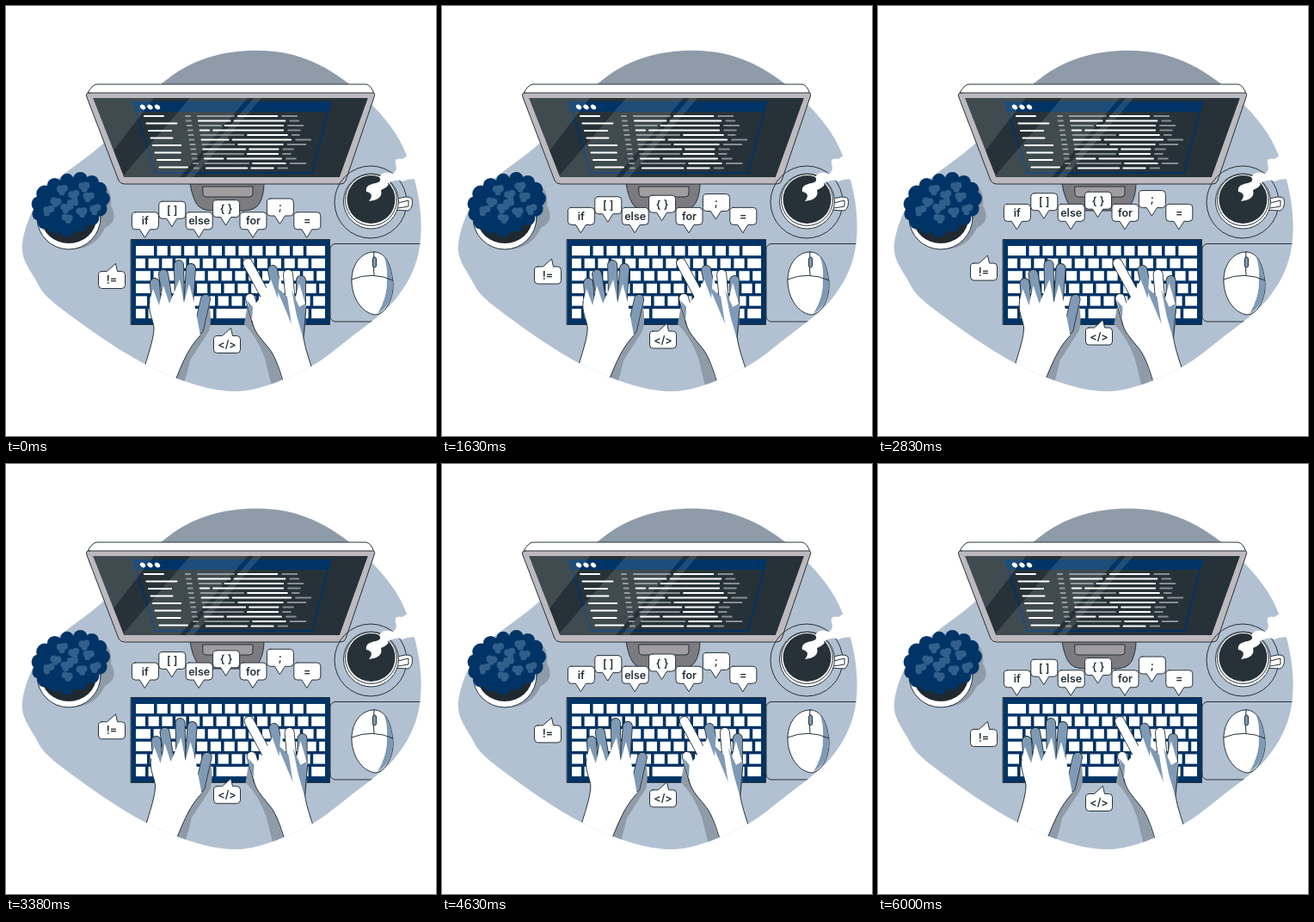
Write an HTML page that moves like this. It is 500x500 px and loops after 6040 ms.

```html
<!DOCTYPE html>
<html lang="en">
<head>
<meta charset="utf-8">
<title>Coding at a desk</title>
<style>
  html, body { margin: 0; width: 100%; height: 100%; overflow: hidden; background: #fff; }
  svg { display: block; width: 100%; height: 100%; }
  text { font: 600 12.5px Inter, "Open Sans", sans-serif; text-anchor: middle; fill: #263238; }
  .ink { stroke: #263238; stroke-width: 1; stroke-linejoin: round; stroke-linecap: round; }
  .line { fill: none; }
  .white { fill: #fff; }
  .navy { fill: #003466; }
  .dark { fill: #263238; }
  .shade { fill: #7f9ab6; }
  .shadow { fill: #8f9ba8; }
</style>
</head>
<body>
<svg viewBox="0 0 500 500">
  <defs>
    <clipPath id="clip"><path id="blob"/></clipPath>
    <clipPath id="screen"><path d="M101 107H421L388 199H137Z"/></clipPath>
  </defs>

  <g clip-path="url(#clip)">
    <rect class="shadow" width="500" height="100"/>
    <rect y="100" width="500" height="400" fill="#b2c1d1"/>
    <rect class="ink line" x="377" y="276.500" width="130" height="90.500" rx="6"/>
  </g>

  <!-- monitor -->
  <path class="ink" fill="#7c7b80" d="M214 206Q216 220 221 229Q226 238 240 238H276Q290 238 295 229Q300 219 300 206Z"/>
  <path class="ink" fill="#a09da1" d="M229 210H287V218Q287 222 283 222H233Q229 222 229 218Z"/>
  <path class="ink white" d="M94 103Q100 91 106 91H418Q424 91 428 102L420 108H100Z"/>
  <path class="ink" fill="#bcb9bf" d="M97 101H426Q430 101 428 106L395 203Q394 207 389 207H138Q133 207 131 203L94 106Q92 101 97 101Z"/>
  <g clip-path="url(#screen)">
    <path class="dark" d="M101 107H421L388 199H137Z"/>
    <path class="navy" d="M146 111H378L374 123H150Z"/>
    <path fill="none" stroke="#003466" stroke-width="2" d="M148 112L173 194H356L377 112Z"/>
    <path fill="#fff" opacity=".12" d="M101 107H172L125 168ZM214 107H281L202 199H135ZM288 107H297L218 199H209Z"/>
    <g class="white" id="code"></g>
  </g>

  <!-- plant -->
  <path class="shadow" d="M84 202Q126 200 122 232Q132 250 115 258Q104 282 78 283Z"/>
  <circle class="ink white" cx="73" cy="246" r="37"/>
  <ellipse cx="73" cy="247" rx="32" ry="29" fill="#20292f"/>
  <g id="leaves" class="navy"></g>
  <g id="tufts" fill="#315f8b"></g>

  <!-- coffee -->
  <circle class="ink line" cx="424" cy="228" r="42"/>
  <path class="ink white" d="M450 226Q468 219 472 224Q474 234 468 238L448 237Z"/>
  <path class="ink line" d="M456 229L468 226V233L456 235"/>
  <circle class="ink white" cx="424.500" cy="227" r="32"/>
  <circle class="ink white" cx="424.500" cy="225.500" r="30"/>
  <circle class="dark" cx="424.500" cy="225" r="28"/>
  <path class="white" d="M484 173Q467 172 461 178Q451 176 453 184Q456 191 450 195Q438 191 434 199Q438 204 430 206Q417 208 419 216Q429 218 422 227Q439 225 436 214Q447 209 444 206Q455 200 461 204Q470 199 484 203Z"/>

  <!-- mouse -->
  <path class="ink white" d="M428 286C442 286 448 302 450 322C451 342 440 359 429 359C414 357 403 340 402 322C401 302 412 286 428 286Z"/>
  <path class="shade" d="M439 290Q449 304 450 324Q449 348 432 358Q444 338 443 318Q444 302 439 290Z"/>
  <path class="ink line" d="M402 318Q426 308 450 319M428 286Q426 299 428 313"/>
  <rect class="ink shade" x="426.500" y="292" width="4" height="12" rx="2"/>

  <rect class="ink navy" x="145.500" y="271.500" width="231" height="99"/>
  <g id="keys" class="white"></g>

  <g clip-path="url(#clip)"><g id="hands">
    <path class="shadow" d="M236 346Q240 366 236 378L214 412Q211 428 203 450L190 448L207 405L228 378ZM281 346L277 370Q292 385 301 410L311 450H326L310 402Z"/>
    <g id="fingers"></g>
    <path class="white" d="M154 446C162 412 172 390 172 374C171 364 165 356 167 343L171 329L178 348L183 325L190 346L202 318L207 345L213 323L219 346L226 383C212 398 206 412 192 448Z"/>
    <path class="white" d="M326 450C318 420 312 405 304 396C295 385 288 378 286 366L291 345L299 335L308 318L316 340L318 312L325 342L331 316L336 342L341 322L349 350L346 385C348 400 354 415 362 440Z"/>
    <path class="shade" d="M313 325L322 346L332 370L327 338ZM332 330L338 360L346 388Q350 370 348 346L341 350ZM280 342L287 350L286 366Z"/>
    <path class="ink line" d="M154 446C162 412 172 390 172 374C171 364 165 356 167 343M226 383C212 398 206 412 192 448M326 450C318 420 312 405 304 396C295 385 288 378 286 366M349 350L346 385C348 400 354 415 362 440"/>
  </g></g>

  <g id="bubbles"></g>
</svg>
<script>
const el = id => document.getElementById(id);
const rect = (x, y, w, h, extra = '') => `<rect x="${x}" y="${y}" width="${w}" height="${h}" ${extra}/>`;
const circle = (x, y, r) => `<circle cx="${x}" cy="${y}" r="${r}"/>`;
const repeat = (n, draw) => Array.from({ length: n }, (_, i) => draw(i)).join('');

let seed = 7;
const random = (min, max) => {
  seed = seed * 16807 % 2147483647;
  return min + (max - min) * seed / 2147483647;
};

// Closed smooth curve through a flat list of x, y pairs.
function smooth(list) {
  const n = list.length / 2;
  const p = i => [list[(i + n) % n * 2], list[(i + n) % n * 2 + 1]];
  let d = 'M' + p(0);
  for (let i = 0; i < n; i++) {
    const [a, b, c, e] = [p(i - 1), p(i), p(i + 1), p(i + 2)];
    const c1 = b.map((v, k) => v + (c[k] - a[k]) / 6);
    const c2 = c.map((v, k) => v - (e[k] - b[k]) / 6);
    d += `C${c1} ${c2} ${c}`;
  }
  return d + 'Z';
}
el('blob').setAttribute('d', smooth([
  19, 276, 45, 216, 113, 160, 180, 91, 235, 60, 300, 52, 357, 65, 410, 100, 457, 155,
  480, 225, 479, 290, 452, 342, 400, 386, 345, 424, 263, 448, 165, 418, 62, 350, 33, 316]));

// Window buttons and code in three slanted columns
const dash = (x, y, w, opacity) => rect(x, y - 0.9, w, 1.8, `rx=".9" opacity="${opacity}"`);
el('code').innerHTML = repeat(3, i => {
  const x = 159 + i * 8.5;
  return `<ellipse cx="${x}" cy="117.500" rx="3.400" ry="2.500" transform="rotate(35 ${x} 117.500)"/>`;
}) + repeat(8, i => dash(160 + i * 2.5, 128 + i * 8.5, random(24, 38), 1))
  + repeat(12, i => {
    const y = 128 + i * 5.5, x = 222 + i * 0.9, split = random(10, 55), end = random(75, 105);
    return dash(208 + i * 0.9, y, 7, 0.45) + dash(x, y, split, i % 2 ? 1 : 0.45)
      + dash(x + split + 3, y, end - split, 1) + dash(x + end + 7, y, random(8, 24), 0.45);
  });

// Foliage: a scalloped ellipse with tufts spread on a sunflower spiral
el('leaves').innerHTML = '<ellipse cx="75" cy="230" rx="38" ry="29"/>' + repeat(15, i => {
  const a = i / 15 * 2 * Math.PI;
  return circle(75 + 37 * Math.cos(a), 230 + 28 * Math.sin(a) - 6 * Math.cos(a), random(7.5, 10));
});
el('tufts').innerHTML = repeat(11, i => {
  const a = i * 2.4, r = Math.sqrt(i / 11);
  const x = 75 + 33 * r * Math.cos(a), y = 229 + 23 * r * Math.sin(a);
  return circle(x, y, 4) + circle(x + 5, y + random(-3, 3), 4) + circle(x + random(-2, 4), y + 4, 3.5);
});

// Each keyboard row starts with a key of its own width and ends with a stretched one.
const pitch = 15.8, gap = 3.6, right = 371;
el('keys').innerHTML = [21, 11, 17, 20, 13, 11].map((first, row) => {
  let keys = '';
  for (let x = 151, w = first; x < right - 5; x += w + gap, w = pitch - gap) {
    if (row === 5 && x > 230 && x < 245) w += pitch * 2;
    if (right - x - w < 10) w = right - x;
    keys += rect(x, 279 + row * 14.6, w, 11.2);
  }
  return keys;
}).join('');

// Outlined round-ended finger from its base to its tip
const finger = (fill, x1, y1, x2, y2) => [['#263238', 12], [fill, 10.2]].map(([color, w]) =>
  `<path d="M${x1} ${y1}L${x2} ${y2}" stroke="${color}" stroke-width="${w}" stroke-linecap="round"/>`).join('');
const blue = '#7f9ab6', white = '#fff';
el('fingers').innerHTML = finger(blue, 175, 350, 173, 322) + finger(blue, 189, 348, 183, 312)
  + finger(blue, 202, 348, 201, 301) + finger(blue, 212, 348, 215, 305) + finger(blue, 224, 376, 232, 341)
  + finger(blue, 343, 356, 343, 319) + finger(white, 331, 345, 328, 312) + finger(blue, 318, 345, 310, 307)
  + finger(white, 306, 345, 281, 299) + finger(white, 292, 368, 284, 340);

// Speech bubble with a tail below, or above when up is set
function bubble(label, x, y, up) {
  const top = up ? 'H10L20 -9L22 0H27' : 'H27';
  const bottom = up ? 'H4' : 'H21L15 29.500L9 20H4';
  return `<g transform="translate(${x} ${y})">
    <path class="ink white" d="M4 0${top}Q31 0 31 4V16Q31 20 27 20${bottom}Q0 20 0 16V4Q0 0 4 0Z"/>
    <text x="15.500" y="14.500">${label.replace('<', '&lt;')}</text></g>`;
}
el('bubbles').innerHTML = ['if', '[ ]', 'else', '{ }', 'for', ';', '='].map((label, i) =>
  bubble(label, 146.4 + i * 31.4, i % 2 ? 228 - i * 0.8 : 239.8)).join('')
  + bubble('!=', 107.5, 308.5, true) + bubble('</>', 241.5, 383.5, true);

const loop = 6040, cycle = 6000;
const shake = [0, -1, 2, -4, 4, -4, 4, -4, 2, -1, 0, 0];

function draw(now) {
  const p = Math.min(now % loop / cycle, 1);
  const lift = 10 * (1 - Math.abs(1 - 2 * p));
  const i = Math.floor(p * 10), f = p * 10 - i;
  const x = shake[i] + (shake[i + 1] - shake[i]) * f * f * (3 - 2 * f);
  el('bubbles').setAttribute('transform', `translate(0 ${-lift})`);
  el('hands').setAttribute('transform', `translate(${x} 0)`);
}
const start = performance.now();
function tick() {
  draw(performance.now() - start);
  requestAnimationFrame(tick);
}
tick();
</script>
</body>
</html>
```
